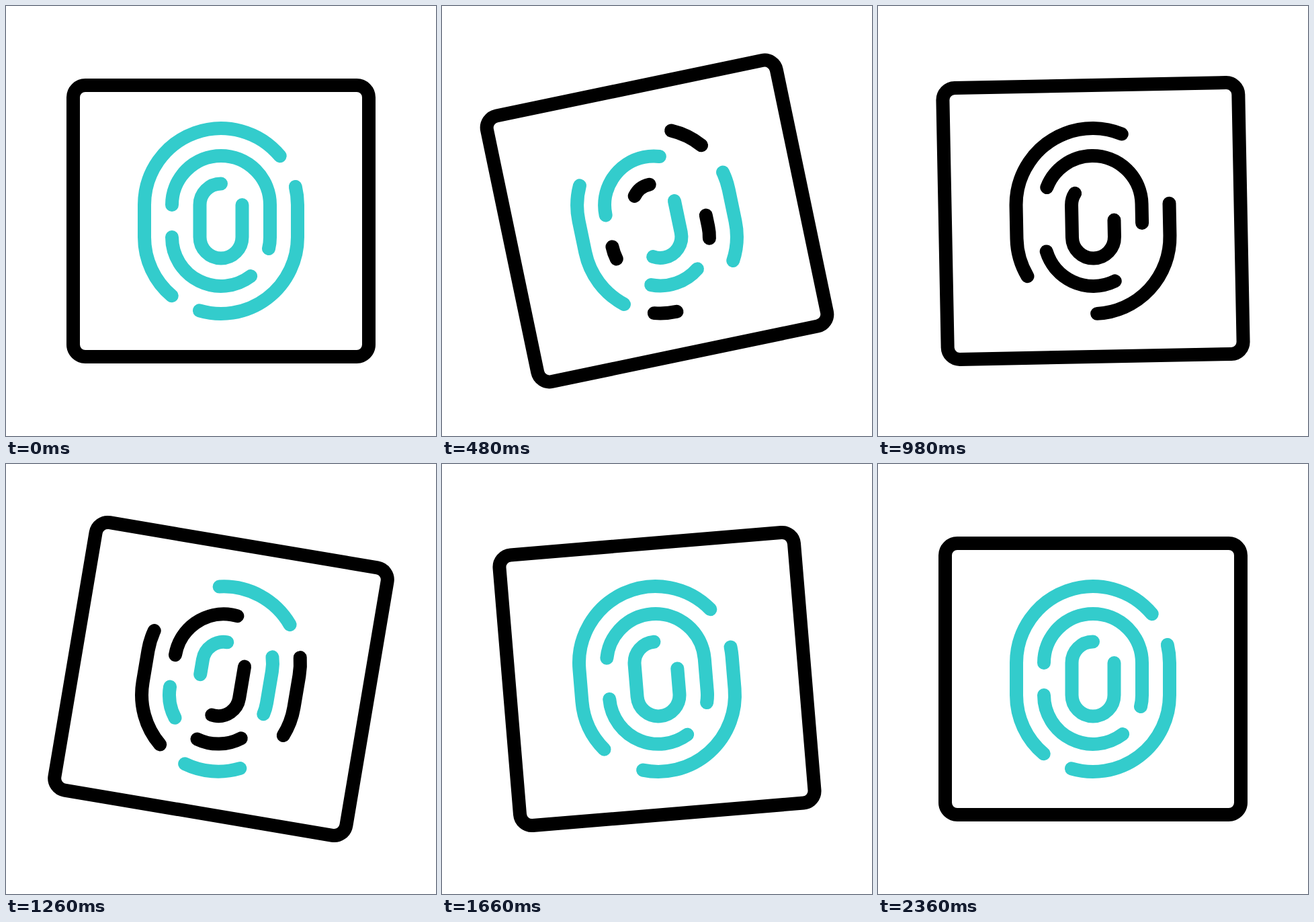
Recreate the animation shown at these times as an HTML page. Size 640 by 640 pixels, loop 2.42 s.

```html
<!DOCTYPE html>
<html lang="en">
<head>
<meta charset="utf-8">
<title>Fingerprint scan</title>
<style>
  html, body { margin: 0; width: 100%; height: 100%; overflow: hidden; background: #fff; }
  svg { display: block; width: 100%; height: 100%; }
  svg * { fill: none; stroke-width: 20; stroke-linecap: round; }
</style>
</head>
<body>
<svg viewBox="0 0 640 640">
  <g id="tile">
    <rect x="100" y="118" width="440" height="404" rx="18" stroke="#000"/>
  </g>
</svg>
<script>
  const LOOP = 2420, STEP = 20, LAST = 2360;
  const TEAL = '#33cccc', BLACK = '#000';

  const ridges = [
    'M407.7 223.2A114 114 0 0 0 206 296V344A114 114 0 0 0 246.7 431.3',
    'M287.9 453.4A114 114 0 0 0 434 344V296A114 114 0 0 0 430.8 269',
    'M391 361.1A73 73 0 0 0 393 344V296A73 73 0 0 0 247 296',
    'M247 344A73 73 0 0 0 364.1 402.1',
    'M320 264.5A31.5 31.5 0 0 0 288.5 296V344A31.5 31.5 0 0 0 351.5 344V296'
  ];

  // [time, degrees]
  const swing = [[0, 0], [740, -15], [1200, 10.2], [1540, -5.2], [1960, -1.75], [LAST, 0]];

  const tile = document.getElementById('tile');

  function addRidges(color) {
    return ridges.map(d => {
      const path = document.createElementNS('http://www.w3.org/2000/svg', 'path');
      path.setAttribute('d', d);
      path.setAttribute('pathLength', 1);
      path.setAttribute('stroke', color);
      return tile.appendChild(path);
    });
  }

  const black = addRidges(BLACK);
  const teal = addRidges(TEAL);

  // Smooth progress from 0 to 1 between two times
  function ramp(t, from, to) {
    const x = Math.min(1, Math.max(0, (t - from) / (to - from)));
    return x * x * (3 - 2 * x);
  }

  function easeInOut(x) {
    return x < 0.5 ? 0.5 * (2 * x) ** 2.4 : 1 - 0.5 * (2 - 2 * x) ** 2.4;
  }

  function angleAt(t) {
    const i = Math.max(1, swing.findIndex(key => t <= key[0]));
    const [t0, a0] = swing[i - 1], [t1, a1] = swing[i];
    return a0 + (a1 - a0) * easeInOut((t - t0) / (t1 - t0));
  }

  function trim(paths, start, end) {
    const shown = end - start > 1e-5;
    for (const path of paths) {
      path.style.display = shown ? '' : 'none';
      path.setAttribute('stroke-dasharray', `${Math.max(0, end - start)} 2`);
      path.setAttribute('stroke-dashoffset', -start);
    }
  }

  function draw(t) {
    tile.setAttribute('transform', `rotate(${angleAt(t)} 320 320)`);
    trim(black, ramp(t, 794, 1634), ramp(t, 300, 1140));
    if (t < 950) trim(teal, ramp(t, 0, 923), 1);
    else trim(teal, 0, ramp(t, 980, 1760));
  }

  const begin = performance.now();

  function tick(now) {
    const t = Math.max(0, now - begin) % LOOP;
    draw(Math.min(LAST, Math.floor(t / STEP) * STEP));
    requestAnimationFrame(tick);
  }

  draw(0);
  requestAnimationFrame(tick);
</script>
</body>
</html>
```
